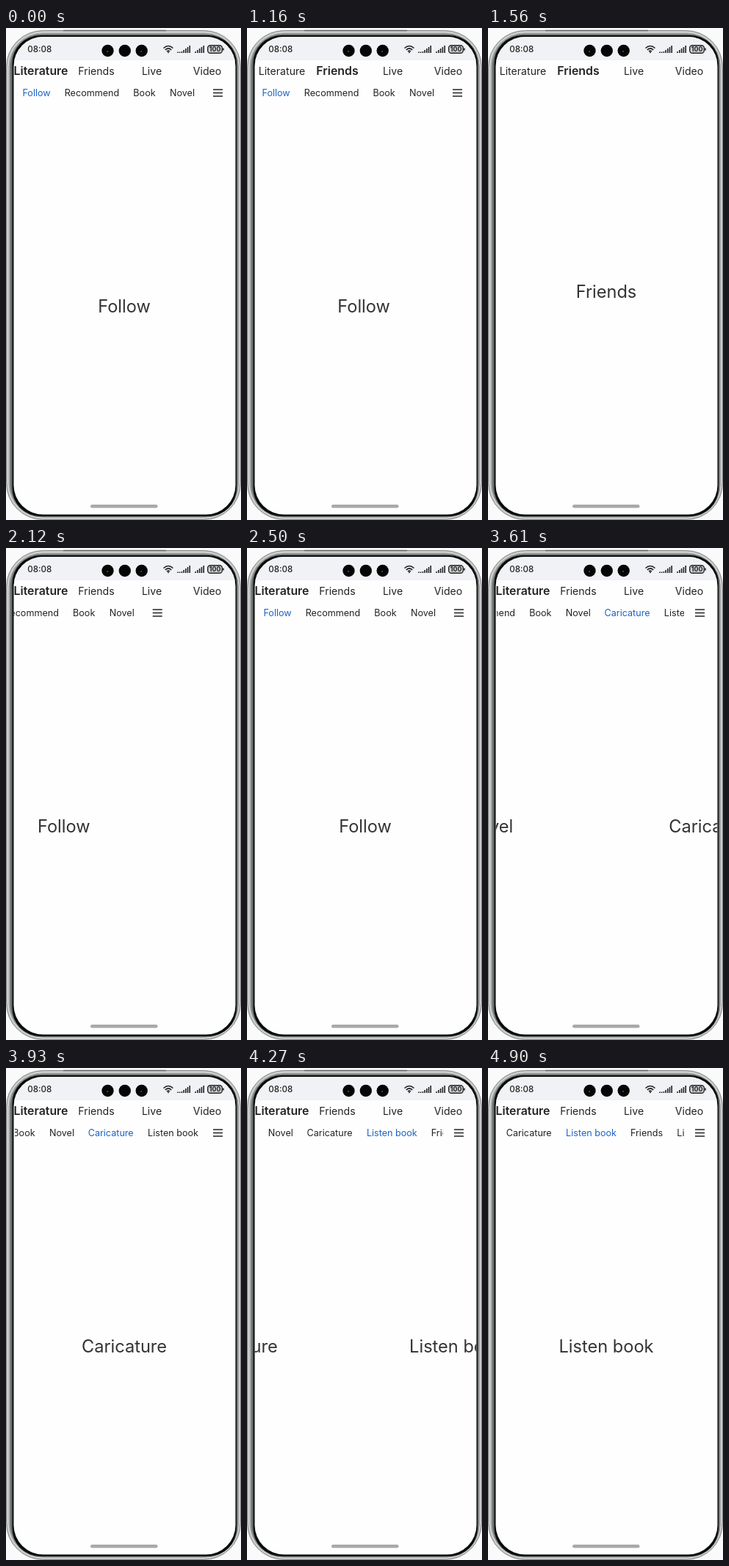
Recreate the animation shown at these times as an HTML page. Size 320x671 px, loop 4.98 s.

```html
<!DOCTYPE html>
<html lang="en">
<head>
<meta charset="utf-8">
<title>Nested tabs</title>
<style>
  html, body { margin: 0; width: 100%; height: 100%; overflow: hidden; background: #fafafa; }
  svg { display: block; width: 320px; height: 671px; }
  text { font-family: Inter, "Open Sans", sans-serif; text-anchor: middle; fill: #222; }
  .top { font-size: 14.1px; }
  .top.on { font-size: 15.9px; font-weight: 600; }
  .sub { font-size: 12.6px; }
  .sub.on { fill: #1b62c4; }
  .big { font-size: 23.6px; fill: #333; }
</style>
</head>
<body>
<svg viewBox="0 0 320 671">
  <defs>
    <clipPath id="screen"><rect x="10.5" y="12" width="302" height="651.5" rx="40"/></clipPath>
    <clipPath id="page"><rect x="10.5" y="72" width="302" height="592"/></clipPath>
    <clipPath id="strip"><rect x="12" y="74" width="255" height="30"/></clipPath>
  </defs>

  <!-- Phone body -->
  <rect x=".5" y="3.5" width="319" height="667" rx="50" fill="#c4c7c6" stroke="#858887"/>
  <rect x="3" y="6" width="314" height="662" rx="47" fill="#a6aaa8" stroke="#dcdedd"/>
  <rect x="5.5" y="8" width="310.5" height="659" rx="44" fill="#6c706e" stroke="#8d918f"/>
  <rect x="8.5" y="10" width="305.5" height="656" rx="38" fill="#080c0a"/>
  <path d="M78 3.5H218" stroke="#5f6261" stroke-width="1.6"/>

  <g clip-path="url(#screen)">
    <path d="M10 12H313V665H10Z" fill="#fefefe"/>
    <g id="outer">
      <g clip-path="url(#strip)"><g id="subs"></g></g>
      <path d="M282 84H295M282 88.5H295M282 93H295" stroke="#222" stroke-width="1.3"/>
      <g clip-path="url(#page)"><g id="inner"></g></g>
      <text class="big" x="463" y="367.6">Friends</text>
    </g>
    <g id="tops"></g>
    <path d="M10 12H313V44H10Z" fill="#f0f2f5"/>
  </g>

  <!-- Status bar -->
  <text x="45.7" y="33" font-size="11.6" font-weight="500">08:08</text>
  <g fill="#050505">
    <circle cx="138.5" cy="31" r="8.2"/><circle cx="161.8" cy="31" r="8.2"/><circle cx="184.7" cy="31" r="8.2"/>
  </g>
  <g fill="#555">
    <circle cx="138" cy="32" r="1"/><circle cx="184" cy="32" r="1"/>
  </g>
  <g fill="none" stroke="#222" stroke-width="1.6">
    <path d="M214.5 27.5Q221 21.5 227.5 27.5M216.8 29.8Q221 26 225.2 29.8M219 32Q221 30.3 223 32"/>
    <path id="bars"/>
    <rect x="274.7" y="23.7" width="19.6" height="10.6" rx="3.5" fill="#cfd1d4" stroke-width="1.4"/>
    <path d="M296 27.5V30.5"/>
  </g>
  <circle cx="221" cy="33.2" r="1" fill="#222"/>
  <text x="284.5" y="32.2" font-size="8.8" font-weight="700">100</text>

  <rect x="115" y="650" width="91.5" height="4.6" rx="2.3" fill="#a9a9a9"/>
</svg>

<script>
const LOOP = 4980, GLIDE = 400, PAGE = 302, SCROLL_LAG = 38;
const $ = id => document.getElementById(id);

// [start time, destination]
const outerMoves = [[1140, 1], [1935, 0]];
const innerMoves = [[2720, 2], [3415, 4], [4116, 5]];
const stripOffset = { 2: 46, 4: 164, 5: 251 };
const stripMoves = innerMoves.map(([at, to]) => [at + SCROLL_LAG, stripOffset[to]]);

const subNames = ["Follow", "Recommend", "Book", "Novel", "Caricature", "Listen book", "Friends", "Live"];
const subCentres = [41.5, 117, 188.5, 240, 306.7, 391.5, 467, 520.5];

function label(parent, cls, text, x, y) {
  const el = document.createElementNS("http://www.w3.org/2000/svg", "text");
  el.setAttribute("class", cls);
  el.setAttribute("x", x);
  el.setAttribute("y", y);
  el.textContent = text;
  return parent.appendChild(el);
}

const tops = ["Literature", "Friends", "Live", "Video"]
  .map((name, i) => label($("tops"), "top", name, 47.5 + 75.5 * i, 64));
const subs = subNames.map((name, i) => label($("subs"), "sub", name, subCentres[i], 93));
subNames.slice(0, 6).forEach((name, i) => label($("inner"), "big", name, 161 + PAGE * i, 387.6));

// Signal bars: the first group starts with two dots
const bar = (x, h) => `M${x} 34v${-h}`;
let bars = bar(234, 1.5) + bar(236.6, 1.5);
for (let i = 0; i < 5; i++) bars += bar(239.4 + 2.7 * i, 2 + 2 * i) + bar(258 + 2.8 * i, 2 + 2 * i);
$("bars").setAttribute("d", bars);

// cubic-bezier(.4, 0, .2, 1)
function ease(p) {
  if (p <= 0) return 0;
  if (p >= 1) return 1;
  let lo = 0, hi = 1, s;
  for (let i = 0; i < 24; i++) {
    s = (lo + hi) / 2;
    const r = 1 - s;
    if (1.2 * s * r * r + 0.6 * s * s * r + s ** 3 < p) lo = s; else hi = s;
  }
  return s * s * (3 - 2 * s);
}

const position = (moves, t) =>
  moves.reduce((v, [at, to]) => v + (to - v) * ease((t - at) / GLIDE), 0);
const selected = (moves, t) =>
  moves.reduce((v, [at, to]) => t >= at ? to : v, 0);
const shift = (id, x) => $(id).setAttribute("transform", `translate(${-x} 0)`);
const mark = (tabs, index) => tabs.forEach((el, i) => el.classList.toggle("on", i === index));

const start = performance.now();
function draw(now) {
  const t = Math.max(0, now - start) % LOOP;
  shift("outer", PAGE * position(outerMoves, t));
  shift("inner", PAGE * position(innerMoves, t));
  shift("subs", position(stripMoves, t));
  mark(tops, selected(outerMoves, t));
  mark(subs, selected(innerMoves, t));
  requestAnimationFrame(draw);
}
draw(start);
</script>
</body>
</html>
```
